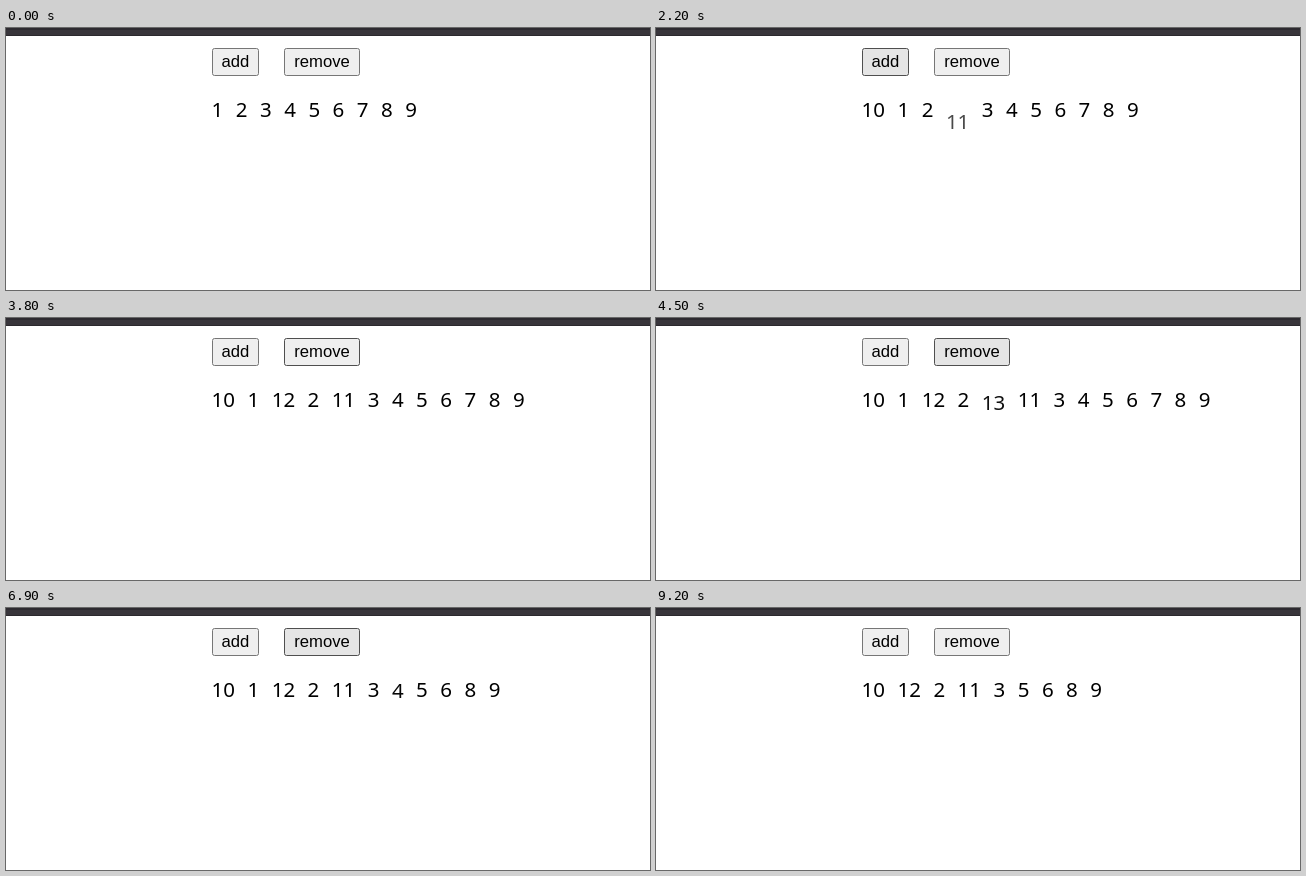
Animation, 644 px wide and 262 px high, one loop 9.4 s. Source, as an HTML page:

```html
<!DOCTYPE html>
<html lang="en">
<head>
<meta charset="utf-8">
<title>List transition</title>
<style>
  html, body { margin: 0; width: 100%; height: 100%; overflow: hidden; background: #fff; }
  svg { display: block; width: 644px; height: 262px; }
  .label { font: 16.67px "Liberation Sans", Arial, sans-serif; text-anchor: middle; }
  .item { font: 20.5px "Noto Sans", "Open Sans", sans-serif; }
</style>
</head>
<body>
<svg viewBox="0 0 644 262">
  <rect width="644" height="262" fill="#fff"/>
  <rect width="644" height="8" fill="#38353b"/>
  <rect width="644" height="2" fill="#2d2a30"/>
  <rect y="7" width="644" height="1" fill="#2b292e"/>
  <g id="buttons"></g>
  <g id="list"></g>
</svg>
<script>
const LOOP = 9400, STEP = 100, DURATION = 1000, SHIFT = 40;
const LEFT = 205.6, BASE = 89, DIGIT = 11.7, GAP = 12.5;

// Box changes happen at add/drop, fades begin at enter/leave.
const items = [
  { n: 10, add: 700, enter: 690 },
  { n: 1, leave: 8200, drop: 9200 },
  { n: 12, add: 2700, enter: 2780 },
  { n: 2 },
  { n: 13, add: 3900, enter: 3820, leave: 4680, drop: 5700 },
  { n: 11, add: 1700, enter: 1780 },
  { n: 3 },
  { n: 4, leave: 6850, drop: 7800 },
  { n: 5 },
  { n: 6 },
  { n: 7, leave: 5750, drop: 6800 },
  { n: 8 },
  { n: 9 }
];

const looks = {
  normal: ["#efefef", "#767676"],
  hover: ["#e5e5e5", "#4f4f4f"],
  over: ["#efefef", "#4f4f4f"],
  active: ["#f5f5f5", "#8d8d8d"]
};

const buttons = [
  { text: "add", x: 206, w: 47,
    states: [[0, "normal"], [500, "hover"], [3600, "normal"], [3900, "hover"], [4300, "normal"]] },
  { text: "remove", x: 278, w: 76,
    states: [[0, "normal"], [200, "hover"], [400, "normal"], [3700, "over"], [3900, "normal"],
      [4400, "hover"], [4700, "active"], [4800, "hover"], [5600, "active"], [5700, "hover"],
      [6700, "active"], [6800, "hover"], [8100, "active"], [8200, "hover"], [8600, "normal"]] }
];

function make(parent, tag, attrs, text = "") {
  const el = document.createElementNS("http://www.w3.org/2000/svg", tag);
  for (const key in attrs) el.setAttribute(key, attrs[key]);
  el.textContent = text;
  return parent.appendChild(el);
}

const buttonLayer = document.getElementById("buttons");
for (const b of buttons) {
  b.el = make(buttonLayer, "rect", { x: b.x + .5, y: 20.5, width: b.w - 1, height: 27, rx: 2 });
  make(buttonLayer, "text", { x: b.x + b.w / 2, y: 39, class: "label" }, b.text);
}
const list = document.getElementById("list");
for (const item of items) item.el = make(list, "text", { class: "item" }, item.n);

// cubic-bezier(.25, .1, .25, 1)
function ease(x) {
  if (x <= 0) return 0;
  if (x >= 1) return 1;
  const curve = (s, a, b) => 3 * a * s * (1 - s) ** 2 + 3 * b * s * s * (1 - s) + s ** 3;
  let lo = 0, hi = 1;
  for (let i = 0; i < 24; i++) {
    const mid = (lo + hi) / 2;
    if (curve(mid, .25, .25) < x) lo = mid; else hi = mid;
  }
  return curve(lo, .1, 1);
}

function shown(item, t) {
  let v = 1;
  if ("enter" in item) v = ease((t - item.enter) / DURATION);
  if (t > item.leave) v = 1 - ease((t - item.leave) / DURATION);
  return v;
}

function draw(t) {
  for (const b of buttons) {
    const state = b.states.filter(s => s[0] <= t).pop()[1];
    b.el.setAttribute("fill", looks[state][0]);
    b.el.setAttribute("stroke", looks[state][1]);
  }
  let x = LEFT;
  for (const item of items) {
    const { el, n, add = 0, drop = LOOP } = item;
    const present = t >= add && t < drop;
    el.style.display = present ? "" : "none";
    if (!present) continue;
    const v = shown(item, t);
    el.setAttribute("x", x);
    el.setAttribute("y", BASE + (1 - v) * SHIFT);
    el.setAttribute("opacity", v < .12 ? 0 : v);
    x += String(n).length * DIGIT + GAP;
  }
}

const start = performance.now();
function tick() {
  const t = (performance.now() - start) % LOOP;
  draw(Math.floor(t / STEP) * STEP);
  requestAnimationFrame(tick);
}
draw(0);
requestAnimationFrame(tick);
</script>
</body>
</html>
```
